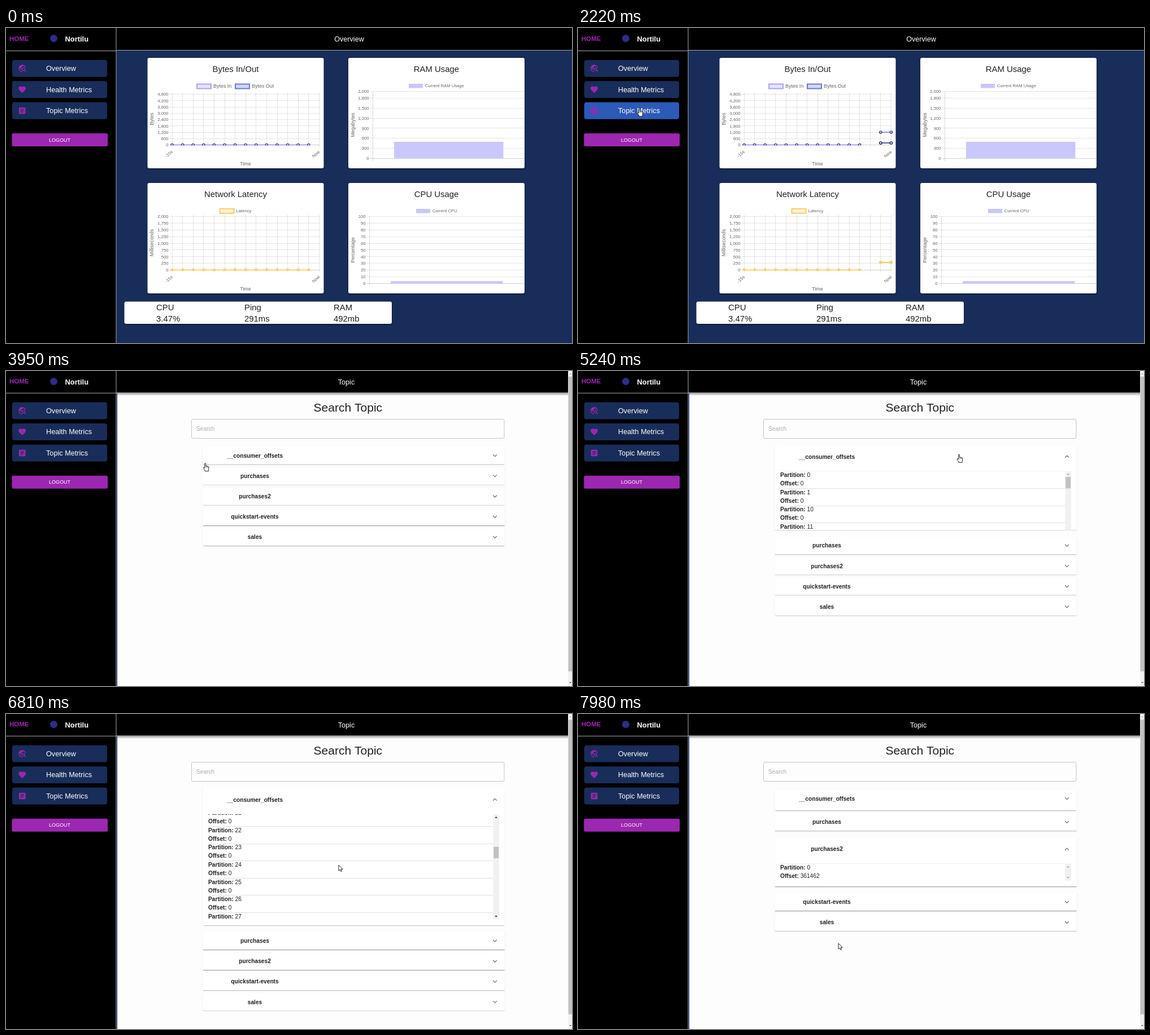
An HTML page with a canvas for the animation above (8000 ms loop, 1002 by 559 pixels).

```html
<!DOCTYPE html>
<html lang="en">
<head>
<meta charset="utf-8">
<title>Metrics dashboard</title>
<style>
html, body { margin: 0; width: 100%; height: 100%; overflow: hidden; background: #000; }
canvas { display: block; }
</style>
</head>
<body>
<canvas id="stage" width="1002" height="559"></canvas>
<script>
const g = document.getElementById('stage').getContext('2d');
const LOOP = 8000, OVERVIEW_END = 2620;
const NAVY = [25, 45, 90], HOVER = [45, 89, 184], PURPLE = '#9c27b0', INK = '#212121';
const GRID = 'rgba(0,0,0,.1)', RULE = '#a9a9a9';
const ROW = 30.6;

const ICONS = {
  explore: 'M19.3 16.9c.4-.7.7-1.5.7-2.4 0-2.5-2-4.5-4.5-4.5S11 12 11 14.5s2 4.5 4.5 4.5c.9 0 1.7-.3 2.4-.7l3.2 3.2 1.4-1.4-3.2-3.2zm-3.8.1c-1.4 0-2.5-1.1-2.5-2.5s1.1-2.5 2.5-2.5 2.5 1.1 2.5 2.5-1.1 2.5-2.5 2.5zM12 20v2C6.48 22 2 17.52 2 12S6.48 2 12 2c4.84 0 8.87 3.44 9.8 8h-2.07c-.64-2.46-2.4-4.47-4.73-5.41V5c0 1.1-.9 2-2 2h-2v2c0 .55-.45 1-1 1H8v2h2v3H9l-4.79-4.79C4.08 10.79 4 11.38 4 12c0 4.41 3.59 8 8 8z',
  heart: 'M12 21.35l-1.45-1.32C5.4 15.36 2 12.28 2 8.5 2 5.42 4.42 3 7.5 3c1.74 0 3.41.81 4.5 2.09C13.09 3.81 14.76 3 16.5 3 19.58 3 22 5.42 22 8.5c0 3.78-3.4 6.86-8.55 11.54z',
  article: 'M19 3H5c-1.1 0-2 .9-2 2v14c0 1.1.9 2 2 2h14c1.1 0 2-.9 2-2V5c0-1.1-.9-2-2-2zm-5 14H7v-2h7v2zm3-4H7v-2h10v2zm0-4H7V7h10v2z',
  chevron: 'M16.59 8.59L12 13.17 7.41 8.59 6 10l6 6 6-6z'
};
for (const k in ICONS) ICONS[k] = new Path2D(ICONS[k]);

// Both pointers have their hot spot at 0,0
const ARROW = new Path2D('M0 0V10.2L2.4 8L4 11.6L5.7 10.9L4.1 7.4H7.2Z');
const HAND = new Path2D('M-1 1C-1 -.3 1 -.3 1 1V5L3 5.3L5 5.9C6.2 6.2 6.6 6.9 6.4 8L5.6 11.5V14.3H-.6V12.6L-3.2 9C-3.8 8 -2.8 7.2 -2 7.9L-1 8.9Z');

// time, x, y
const PATH = [
  [730, 362, 546], [800, 282, 535], [1070, 282, 535], [1450, 225, 330], [1650, 170, 200],
  [1820, 112, 145], [2080, 110.5, 143], [2220, 108.5, 142.5], [2620, 108.5, 142.5],
  [3460, 112, 146], [3560, 137, 160], [3680, 190, 192], [3800, 270, 188],
  [3950, 352.5, 163.5], [4230, 417, 154], [4630, 674.5, 148], [5600, 674.5, 148],
  [5950, 612, 250], [6130, 601.5, 260.5], [6810, 589, 268], [6940, 580, 275],
  [7220, 483, 395], [7360, 464.5, 441], [7700, 464.5, 441], [7980, 461, 407]
];
const HAND_SPANS = [[1750, 3560], [3880, 5680], [7190, 7830]];
const SCROLL = [[6060, 0], [6130, 31.7], [6400, 200], [6810, 437], [6940, 516]];

const clamp = v => Math.max(0, Math.min(1, v));
const lerp = (a, b, p) => a + (b - a) * p;

function track(keys, t, n = 1) {
  if (t <= keys[0][0]) return keys[0][n];
  for (let i = 1; i < keys.length; i++) {
    const a = keys[i - 1], b = keys[i];
    if (t < b[0]) return lerp(a[n], b[n], (t - a[0]) / (b[0] - a[0]));
  }
  return keys[keys.length - 1][n];
}

// cubic-bezier(.4, 0, .2, 1)
function ease(t, start, dur) {
  const x = clamp((t - start) / dur);
  let lo = 0, hi = 1;
  for (let i = 0; i < 18; i++) {
    const s = (lo + hi) / 2, r = 1 - s;
    if (1.2 * r * r * s + .6 * r * s * s + s ** 3 < x) lo = s; else hi = s;
  }
  return 3 * (1 - lo) * lo * lo + lo ** 3;
}

function rect(x, y, w, h, color) {
  g.fillStyle = color;
  g.fillRect(x, y, w, h);
}

function box(x, y, w, h, r, color, shadow, drop = 1, blur = 2.5) {
  g.save();
  if (shadow) {
    g.shadowColor = shadow;
    g.shadowBlur = blur;
    g.shadowOffsetY = drop;
  }
  g.fillStyle = color;
  g.beginPath();
  g.roundRect(x, y, w, h, r);
  g.fill();
  g.restore();
}

// A sheet with three thin layered shadows
function sheet(x, y, w, h, r) {
  box(x, y, w, h, r, '#fff', 'rgba(0,0,0,.12)', .65, 1.9);
  box(x, y, w, h, r, '#fff', 'rgba(0,0,0,.14)', .65, .65);
  box(x + .65, y + .65, w - 1.3, h - 1.3, r, '#fff', 'rgba(0,0,0,.2)', 1.3, .65);
  box(x, y, w, h, r, '#fff');
}

// cy is the middle of the capitals; returns the width
function text(s, x, cy, size, color, align = 'left', weight = '') {
  g.font = `${weight} ${size}px "Liberation Sans", Arial, sans-serif`;
  g.textAlign = align;
  g.fillStyle = color;
  g.fillText(s, x, cy + size * .358);
  return g.measureText(s).width;
}

function turned(s, x, y, size, angle, align) {
  g.save();
  g.translate(x, y);
  g.rotate(angle);
  text(s, 0, 0, size, '#666', align);
  g.restore();
}

function icon(name, cx, cy, color, angle = 0) {
  g.save();
  g.translate(cx, cy);
  g.rotate(angle);
  g.scale(.645, .645);
  g.translate(-12, -12);
  g.fillStyle = color;
  g.fill(ICONS[name], 'evenodd');
  g.restore();
}

function sidebar(t, dy) {
  rect(0, 0, 195, 559, '#000');
  text('HOME', 6, 19 + dy / 2, 11.5, PURPLE, 'left', 'bold');
  g.fillStyle = '#2f2c88';
  g.beginPath();
  g.arc(84.5, 18.5, 6.5, 0, 7);
  g.fill();
  text('Nortilu', 104.5, 19, 12.9, '#fff', 'left', 'bold');
  const hover = ease(t, 1750, 250) - ease(t, 3540, 250);
  [['Overview', 'explore'], ['Health Metrics', 'heart'], ['Topic Metrics', 'article']].forEach(([label, name], i) => {
    const y = 56.8 + 37.5 * i + dy, p = i === 2 ? hover : 0;
    box(11, y, 168, 30, 4, `rgb(${NAVY.map((c, k) => lerp(c, HOVER[k], p))})`);
    icon(name, 28.7, y + 15, PURPLE);
    text(label, 71, y + 14.8, 12.7, '#fff');
  });
  box(10.5, 187 + dy, 169.5, 23, 2.5, PURPLE);
  text('LOGOUT', 95, 198.3 + dy, 9.04, '#fff', 'center');
  rect(0, 40 + dy, 195, 1, RULE);
  rect(194.5, 0, 1, 559, RULE);
}

function axisY(labels, x, top, step, right) {
  labels.forEach((s, i) => {
    const y = top + step * i;
    rect(x - 4.5, Math.floor(y), right - x + 4.5, 1, i === labels.length - 1 ? 'rgba(0,0,0,.18)' : GRID);
    text(s, x - 6.5, y, 7.7, '#666', 'right');
  });
}

const ticks = (max, step) =>
  Array.from({ length: Math.floor(max / step) + 1 }, (_, i) => (max - i * step).toLocaleString('en-US'));

const px = i => 294 + 18.6 * i;

function series(from, to, y, line, dot, fill) {
  if (to < from) return;
  g.strokeStyle = line;
  g.lineWidth = 1.9;
  g.beginPath();
  g.moveTo(px(from), y);
  g.lineTo(px(to), y);
  g.stroke();
  g.strokeStyle = dot;
  g.fillStyle = fill;
  g.lineWidth = 1.4;
  for (let i = from; i <= to; i++) {
    g.beginPath();
    g.arc(px(i), y, 2.1, 0, 7);
    g.fill();
    g.stroke();
  }
}

function legend(x, y, line, fill, label, size) {
  rect(x, y, 27, 10, line);
  rect(x + 2, y + 2, 23, 6, fill);
  text(label, x + 30, y + 4.6, size, '#666');
}

function lineChart(cy, title, unit, labels, top, step) {
  const zero = top + step * 8;
  text(title, 406.5, cy + 20, 14.9, INK, 'center');
  axisY(labels, 294, top, step, 555);
  for (let i = 0; i < 15; i++) rect(Math.floor(px(i)), top - 3, 1, zero - top + 7.5, GRID);
  turned(unit, 258, (top + zero) / 2 - 1, 8.9, -Math.PI / 2, 'center');
  turned('-15s', 294, zero + 11, 7.7, -.7, 'right');
  turned('Now', 554.5, zero + 11, 7.7, -.7, 'right');
  text('Time', 424, cy + 187.5, 8.9, '#666', 'center');
  return zero;
}

function clipped(bottom, draw) {
  g.save();
  g.beginPath();
  g.rect(200, 0, 400, bottom);
  g.clip();
  draw();
  g.restore();
}

function barChart(cy, title, unit, labels, ys, x, legendX, name, bar) {
  text(title, 762, cy + 20, 14.9, INK, 'center');
  rect(legendX, cy + 46, 25, 7.5, '#c9c7fe');
  text(name, legendX + 28.7, cy + 49.3, 7.7, '#666');
  labels.forEach((s, i) => {
    rect(x - 4.5, Math.floor(ys[i]), 917 - x + 4.5, 1, i === labels.length - 1 ? 'rgba(0,0,0,.18)' : GRID);
    text(s, x - 6.5, ys[i], 7.7, '#666', 'right');
  });
  const zero = ys[ys.length - 1];
  rect(x, ys[0], 1, zero - ys[0] + 5, 'rgba(0,0,0,.14)');
  turned(unit, 613.5, (ys[0] + zero) / 2, 8.9, -Math.PI / 2, 'center');
  rect(bar[0], zero - bar[2], bar[1], bar[2], '#c9c7fe');
}

function overview(t) {
  rect(0, 0, 1002, 559, `rgb(${NAVY})`);
  rect(195, 0, 807, 39, '#000');
  rect(195, 39, 807, 1, RULE);
  text('Overview', 607.5, 19.3, 12.6, '#fff', 'center');
  for (const x of [250.5, 606]) for (const y of [53, 275]) box(x, y, 312, 196, 3, '#fff', 'rgba(0,0,0,.6)');

  const shift = t < 330 ? 0 : t < 1890 ? 1 : 2;
  const old = 13 - shift, fresh = 15 - shift;
  let zero = lineChart(53, 'Bytes In/Out', 'Bytes', ticks(4800, 600), 117.5, 11.25);
  legend(337, 98.5, '#a9a4f2', '#e6e4fd', 'Bytes In', 8.95);
  legend(405, 98.5, '#6a76d6', '#d5d8f2', 'Bytes Out', 8.95);
  clipped(zero + 1, () => {
    series(0, old, zero, '#a19cf0', '#3c3790', '#dcdafa');
    series(fresh, 14, 204, '#5560bd', '#15154c', '#fff');
    series(fresh, 14, 185, '#9a95f2', '#3c3790', '#dcdafa');
  });

  zero = lineChart(275, 'Network Latency', 'Milliseconds', ticks(2000, 250), 334.5, 11.88);
  legend(377.5, 319.8, '#fbcd62', '#fff3d9', 'Latency', 7.7);
  clipped(zero + 1, () => {
    series(0, old, zero, '#fbcd62', '#fbcd62', '#fbcd62');
    series(fresh, 14, 416, '#fbcd62', '#fbcd62', '#fbcd62');
  });

  const ram = ['2,000', ...ticks(1800, 300)];
  barChart(53, 'RAM Usage', 'Megabytes', ram, ram.map(s => 231.2 - parseInt(s.replace(',', '')) * .0593),
    649, 713, 'Current RAM Usage', [687, 193.5, 29.2]);
  const cpu = ticks(100, 10);
  barChart(275, 'CPU Usage', 'Percentage', cpu, cpu.map(s => 453.3 - s * 1.187),
    643, 726, 'Current CPU', [681, 198.5, 4.1]);

  box(209.5, 485.5, 473.5, 39.5, 3, '#fff', 'rgba(0,0,0,.7)');
  [[266, 'CPU', '3.47%'], [422, 'Ping', '291ms'], [580, 'RAM', '492mb']].forEach(([x, a, b]) => {
    text(a, x, 495.5, 14.9, INK);
    text(b, x, 515.3, 14.9, INK);
  });
  sidebar(t, 0);
}

function triangle(cx, cy, dir, color, r = 2.6) {
  g.fillStyle = color;
  g.beginPath();
  g.moveTo(cx - r, cy + dir * r / 2);
  g.lineTo(cx + r, cy + dir * r / 2);
  g.lineTo(cx, cy - dir * r / 2);
  g.fill();
}

function details(y, rows, view, scroll) {
  const top = y + 5.2, full = rows.length * ROW, max = full - view;
  g.save();
  g.beginPath();
  g.rect(350, top, 530, view);
  g.clip();
  rows.forEach(([id, offset], i) => {
    const ry = top + i * ROW - scroll;
    if (ry < top - ROW || ry > top + view) return;
    rect(358, Math.round(ry), 504.5, 1, '#e0e0e0');
    [['Partition:', id, 7], ['Offset:', offset, 22.1]].forEach(([label, value, dy]) => {
      const w = text(label, 358, ry + dy, 10.2, INK, 'left', 'bold');
      text(value, 360.8 + w, ry + dy, 10.2, INK);
    });
  });
  rect(862.5, top, 10.5, view, '#f1f1f1');
  const off = '#a3a3a3', on = '#303030';
  triangle(867.7, top + 5.5, 1, scroll > 0 ? on : off);
  triangle(867.7, top + view - 5.5, -1, max > 1 ? on : off);
  if (max > 1) {
    const run = view - 21, thumb = run * view / full;
    rect(863.2, top + 10.5 + (run - thumb) * scroll / max, 9, thumb, '#c1c1c1');
  }
  g.restore();
}

// Partition ids come sorted as strings
const many = Array.from({ length: 50 }, (_, i) => String(i)).sort().map(id => [id, '0']);

function topics(t) {
  rect(0, 0, 1002, 559, '#fdfdfd');
  rect(195, 39, 2, 520, `rgb(${NAVY})`);
  const fade = g.createLinearGradient(0, 39, 0, 44);
  fade.addColorStop(0, 'rgba(0,0,0,.38)');
  fade.addColorStop(1, 'rgba(0,0,0,0)');
  rect(197, 39, 798, 5, fade);
  rect(195, 0, 800, 38.5, '#000');
  rect(195, 38.5, 800, 1, RULE);
  text('Topic', 602.5, 19.3, 12.6, '#fff', 'center');
  rect(995, 0, 7, 559, '#f1f1f1');
  rect(995.5, 10, 6.5, 523, '#c1c1c1');
  triangle(999, 5, 1, '#a3a3a3', 2);
  triangle(999, 553, -1, '#505050', 2);

  text('Search Topic', 605.3, 64.6, 21.05, INK, 'center');
  g.strokeStyle = '#c4c4c4';
  g.lineWidth = 1;
  g.beginPath();
  g.roundRect(328.5, 85.5, 553.5, 34, 2.5);
  g.stroke();
  text('Search', 337, 102, 10.2, '#adadad');

  const OPEN = 5125, SWAP = 7732;
  const first = { e: ease(t, OPEN, 150) - ease(t, SWAP, 150), p: ease(t, OPEN, 315) - ease(t, SWAP, 315), h: 202.4, view: 187, rows: many, scroll: track(SCROLL, t) };
  const third = { e: ease(t, SWAP, 150), p: ease(t, SWAP, 221), h: 45.8, view: ROW, rows: [['0', '361462']], scroll: 0 };
  const shut = { e: 0, p: 0, h: 0 };
  const items = [['__consumer_offsets', first], ['purchases', shut], ['purchases2', third], ['quickstart-events', shut], ['sales', shut]];
  let y = 134.5 - 3 * first.e;
  items.forEach(([name, a], i) => {
    const head = 31 + 10 * a.e, h = head + a.h * a.p, cy = y + head / 2;
    sheet(348.5, y, 534.5, h, i === 0 || i === 4 ? 2.5 : 0);
    text(name, 440.5, cy, 10.2, INK, 'center', 'bold');
    icon('chevron', 865.5, cy, '#757575', Math.PI * a.e);
    if (a.p > 0) {
      g.save();
      g.beginPath();
      g.rect(348, y, 536, h);
      g.clip();
      details(y + head, a.rows, a.view, a.scroll);
      g.restore();
    }
    const next = items[i + 1];
    y += h + 5.15 + (next ? 6.9 * Math.max(a.e, next[1].e) : 0);
  });
  sidebar(t, -1.3);
}

function pointer(t) {
  if (t < PATH[0][0]) return;
  const shape = HAND_SPANS.some(([a, b]) => t >= a && t < b) ? HAND : ARROW;
  g.save();
  g.translate(track(PATH, t, 1), track(PATH, t, 2));
  g.lineJoin = 'round';
  g.lineWidth = .9;
  g.fillStyle = '#fff';
  g.strokeStyle = '#111';
  g.fill(shape);
  g.stroke(shape);
  if (shape === HAND) {
    g.lineWidth = .6;
    g.stroke(new Path2D('M1 5V8M2.9 5.4V8M4.8 6V8.2'));
  }
  g.restore();
}

const start = performance.now();
function frame() {
  const t = (performance.now() - start) % LOOP;
  (t < OVERVIEW_END ? overview : topics)(t);
  pointer(t);
  requestAnimationFrame(frame);
}
frame();
</script>
</body>
</html>
```
